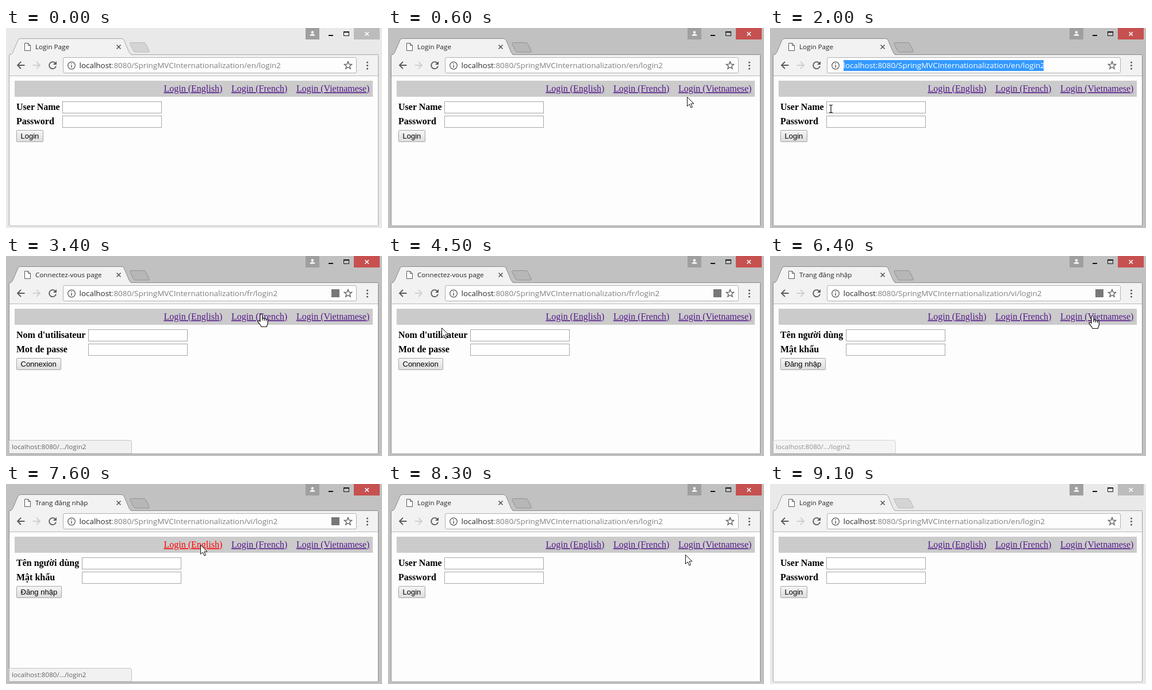
Animation of 654 by 349 pixels, one loop 9.4 s. Source, as an HTML page:

```html
<!DOCTYPE html>
<html lang="en">
<head>
<meta charset="utf-8">
<title>Login Page</title>
<style>
  html, body { margin: 0; width: 100%; height: 100%; overflow: hidden; background: #e9e9e9; }
  svg { display: block; width: 654px; height: 349px; }
  .ui { font-family: "Open Sans", "Noto Sans", sans-serif; font-size: 11.65px; }
  .url { font-size: 13.45px; }
  .label { font: bold 16px "Liberation Serif", serif; }
  .link { font: 16px "Liberation Serif", serif; text-decoration: underline; }
  .btn { font: 13px "Liberation Sans", sans-serif; }
  .icon { fill: none; stroke: #5a5a5a; stroke-width: 1.8; }
  text { white-space: pre; }
</style>
</head>
<body>
<svg viewBox="0 0 654 349" xmlns="http://www.w3.org/2000/svg">
  <defs>
    <linearGradient id="face" x2="0" y2="1">
      <stop stop-color="#f6f6f6"/><stop offset="1" stop-color="#dcdcdc"/>
    </linearGradient>
  </defs>

  <!-- window frame -->
  <rect id="frame" width="654" height="349"/>
  <rect x="521" width="24" height="20" fill="#9f9f9f"/>
  <circle cx="533" cy="7.5" r="2.2" fill="#fff"/>
  <path d="M528.5 13.5q0-3 4.5-3t4.500 3z" fill="#fff"/>
  <path d="M561 13h8" stroke="#111" stroke-width="2"/>
  <path d="M587.500 7v6.500h9V7M587 7h10" fill="none" stroke="#111"/>
  <path d="M587 7h10" stroke="#111" stroke-width="2"/>
  <rect id="close" x="605" width="45" height="20"/>
  <path d="M624.500 7l6.500 6.500M631 7l-6.500 6.500" stroke="#fff" stroke-width="1.6"/>

  <!-- tab strip and toolbar -->
  <path id="newTab" d="M217.500 25.500H240q2 0 3 2l6 12q1 2.500-1 2.500H225q-2 0-3-2l-6-12q-1-2.500 1.500-2.500z"/>
  <rect x="5.500" y="46.500" width="642" height="298.500" rx="1" fill="#f2f2f2" class="edge"/>
  <path d="M6 47.500C10 47 11 44 12 42L21 21q1.200-2.500 4-2.500H201q3 0 4.200 2.500L214 42q2 4.500 5 5.500z" fill="#f2f2f2"/>
  <path d="M6 46.500C10 46 11 44 12 42L21 21q1.200-2.500 4-2.500H201q3 0 4.200 2.500L214 42q2 4 5 4.500" fill="none" class="edge"/>
  <path d="M32.500 26.500h6l4 4v9h-10zM38.500 26.500v4h4" fill="#fff" stroke="#555"/>
  <text id="title" class="ui" x="51" y="37" fill="#222"/>
  <path d="M192.500 29.500l7 7M199.500 29.500l-7 7" stroke="#555" stroke-width="1.6"/>
  <path class="icon" d="M32.500 65H20M26 59l-6 6 6 6"/>
  <path class="icon" d="M46.500 65H59M53 59l6 6-6 6" style="stroke:#d0d0d0"/>
  <path class="icon" d="M85.500 61A6 6 0 1 0 87 66.500"/>
  <path d="M88 58v6h-6z" fill="#5a5a5a"/>
  <rect x="99.500" y="51.500" width="510" height="27" rx="2.500" fill="#fdfdfd" stroke="#b0b0b0"/>
  <circle cx="114" cy="65.500" r="6.300" class="icon" style="stroke-width:1.300"/>
  <path d="M114 64.500v4.500M114 61.500v1.500" stroke="#5a5a5a" stroke-width="1.500"/>
  <rect id="selection" x="128" y="56" width="348" height="19" fill="#3399ff"/>
  <text class="ui url" x="127.500" y="70"><tspan id="host">localhost</tspan><tspan id="path"/></text>
  <rect id="translate" x="566" y="58" width="14" height="14" fill="#777"/>
  <path id="star" class="icon" style="stroke-width:1.300"/>
  <g fill="#5a5a5a">
    <circle cx="628.500" cy="60" r="1.600"/><circle cx="628.500" cy="65.500" r="1.600"/><circle cx="628.500" cy="71" r="1.600"/>
  </g>

  <!-- page -->
  <rect x="6" y="83" width="641" height="261.500" fill="#fdfdfd"/>
  <path d="M6 83.500h641" stroke="#b8b8b8"/>
  <rect x="15" y="92" width="623" height="28" fill="#cbcbcb"/>
  <text class="link" x="274.500" y="111">Login (English)</text>
  <text class="link" x="392" y="111">Login (French)</text>
  <text class="link" x="505" y="111">Login (Vietnamese)</text>
  <text id="user" class="label" x="18" y="143"/>
  <text id="pass" class="label" x="18" y="168"/>
  <g fill="#fff" stroke="#a6a6a6">
    <rect class="field" y="128.500" width="172" height="20"/>
    <rect class="field" y="153.500" width="172" height="20"/>
    <rect id="button" x="18.500" y="178.500" height="20" rx="1" fill="url(#face)"/>
  </g>
  <text id="submit" class="btn" x="25.500" y="193"/>

  <g id="status">
    <path d="M5.500 344.500v-23H215q3.500 0 3.500 3.500v19.500z" fill="#f1f1f1" stroke="#c4c4c4"/>
    <text class="ui" x="10" y="337" fill="#636363">localhost:8080/.../login2</text>
  </g>

  <g id="cursor" stroke-linejoin="round">
    <path id="arrow" d="M.5.500V16.500L4.300 13l2.700 6.200 2.500-1.100L6.900 12H12z" fill="#fff" stroke="#111"/>
    <g id="hand" fill="#fff" stroke="#111" stroke-width="1.200">
      <path d="M-2 13.500V2.500a2 2 0 0 1 4 0V8a1.900 1.900 0 0 1 3.300.700 1.900 1.900 0 0 1 3.200.900A1.700 1.700 0 0 1 11.400 11v5c0 3-2 4-2 6.500H0C0 19.500-5 17-6 13c-.400-2 2.500-2.200 4 .5z"/>
      <path d="M2 8v3.500M5.300 9v3M8.500 10v2.500" fill="none"/>
    </g>
    <path id="beam" d="M-3-6.500h2q1 0 1 1v11q0 1-1 1h-2M3-6.500h-2q-1 0-1 1v11q0 1 1 1h2" fill="none" stroke="#111" stroke-width="1.200"/>
  </g>
</svg>
<script>
const LOOP = 9400, STEP = 100;
const $ = id => document.getElementById(id);
const all = sel => [...document.querySelectorAll(sel)];
const show = (el, on) => el.setAttribute('visibility', on ? 'visible' : 'hidden');
const within = (t, a, b) => t >= a && t < b;
const mix = (a, b, k) => `rgb(${a.map((v, i) => Math.round(v + (b[i] - v) * k))})`;
const gray = v => [v, v, v];

const pages = {
  en: { title: 'Login Page', user: 'User Name', pass: 'Password', submit: 'Login', field: 98, button: 46 },
  fr: { title: 'Connectez-vous page', user: "Nom d'utilisateur", pass: 'Mot de passe', submit: 'Connexion', field: 143, button: 77 },
  vi: { title: 'Trang đăng nhập', user: 'Tên người dùng', pass: 'Mật khẩu', submit: 'Đăng nhập', field: 132, button: 78 }
};

// pointer hot spot: time, x, y
const route = [
  [200, 560, 200], [600, 520, 120], [1000, 489, 66], [1200, 489, 66],
  [1500, 270, 100], [1800, 64, 147], [2000, 106, 141], [2100, 84, 146], [2200, 77, 151],
  [2400, 210, 138], [2700, 444, 101], [4000, 444, 101],
  [4500, 93, 125], [4700, 94, 130], [5000, 115, 133],
  [5500, 330, 127], [6000, 561, 104], [6800, 561, 104],
  [7200, 440, 114], [7500, 338, 106], [8000, 338, 106], [8400, 577, 128]
];

const links = all('.link'), fields = all('.field'), edges = all('.edge');
const spans = [[274, 377], [392, 490], [505, 633]];
const presses = [[7500, 7700], [2900, 3100], [6100, 6200]];
const bubbles = [[2900, 3600], [6100, 6400], [7400, 7900]];

$('star').setAttribute('d', 'M' + Array.from({ length: 10 }, (_, i) => {
  const r = i % 2 ? 3 : 7, a = (i / 5 - 0.5) * Math.PI;
  return `${(595 + r * Math.cos(a)).toFixed(2)} ${(65.5 + r * Math.sin(a)).toFixed(2)}`;
}).join('L') + 'z');

function pointer(t) {
  const i = route.findIndex(p => p[0] > t);
  if (i < 0) return route[route.length - 1].slice(1);
  if (i === 0) return route[0].slice(1);
  const [t0, x0, y0] = route[i - 1], [t1, x1, y1] = route[i];
  const k = (t - t0) / (t1 - t0);
  return [x0 + (x1 - x0) * k, y0 + (y1 - y0) * k];
}

function shape(t, x, y, fieldX) {
  if (within(t, 7500, 8000)) return 'arrow';
  if (y >= 98 && y < 116 && spans.some(([a, b]) => x >= a && x <= b)) return 'hand';
  const inField = x >= fieldX && x <= fieldX + 173 && (within(y, 128, 150) || within(y, 153, 175));
  const inAddress = x > 120 && x < 560 && within(y, 52, 79);
  return inField || inAddress ? 'beam' : 'arrow';
}

function bubbleOpacity(t) {
  for (const [from, fade] of bubbles) {
    if (within(t, from, fade)) return 1;
    if (within(t, fade, fade + 200)) return t < fade + STEP ? 0.7 : 0.35;
  }
  return 0;
}

function drawFrame(t) {
  const k = within(t, 200, 9100) ? (t < 300 ? 0.5 : 1) : 0;
  $('frame').setAttribute('fill', mix(gray(233), gray(193), k));
  $('close').setAttribute('fill', mix(gray(188), [199, 80, 80], k));
  $('newTab').setAttribute('fill', mix(gray(212), gray(183), k));
  $('newTab').setAttribute('stroke', mix(gray(184), gray(145), k));
  edges.forEach(e => e.setAttribute('stroke', mix(gray(165), gray(138), k)));
}

function drawPage(t) {
  const lang = within(t, 3100, 6200) ? 'fr' : within(t, 6200, 7700) ? 'vi' : 'en';
  const page = pages[lang];
  for (const id of ['title', 'user', 'pass', 'submit']) $(id).textContent = page[id];
  $('path').textContent = `:8080/SpringMVCInternationalization/${lang}/login2`;
  fields.forEach(f => f.setAttribute('x', page.field + 0.5));
  $('button').setAttribute('width', page.button);

  const selected = within(t, 1200, 2900);
  show($('selection'), selected);
  $('host').setAttribute('fill', selected ? '#fff' : '#2b2b2b');
  $('path').setAttribute('fill', selected ? '#fff' : '#808080');
  show($('translate'), within(t, 3300, 7700));
  links.forEach((l, i) => l.setAttribute('fill', within(t, ...presses[i]) ? '#ff0000' : '#551a8b'));
  $('status').setAttribute('opacity', bubbleOpacity(t));
  return page;
}

function drawPointer(t, page) {
  const [x, y] = pointer(t).map(Math.round);
  const kind = shape(t, x, y, page.field);
  const visible = within(t, 200, 9100);
  for (const id of ['arrow', 'hand', 'beam']) show($(id), visible && id === kind);
  $('cursor').setAttribute('transform', `translate(${x} ${y})`);
}

function render(ms) {
  const t = Math.floor((ms % LOOP) / STEP) * STEP;
  drawFrame(t);
  drawPointer(t, drawPage(t));
}

const start = performance.now();
function tick() {
  render(performance.now() - start);
  requestAnimationFrame(tick);
}
tick();
</script>
</body>
</html>
```
